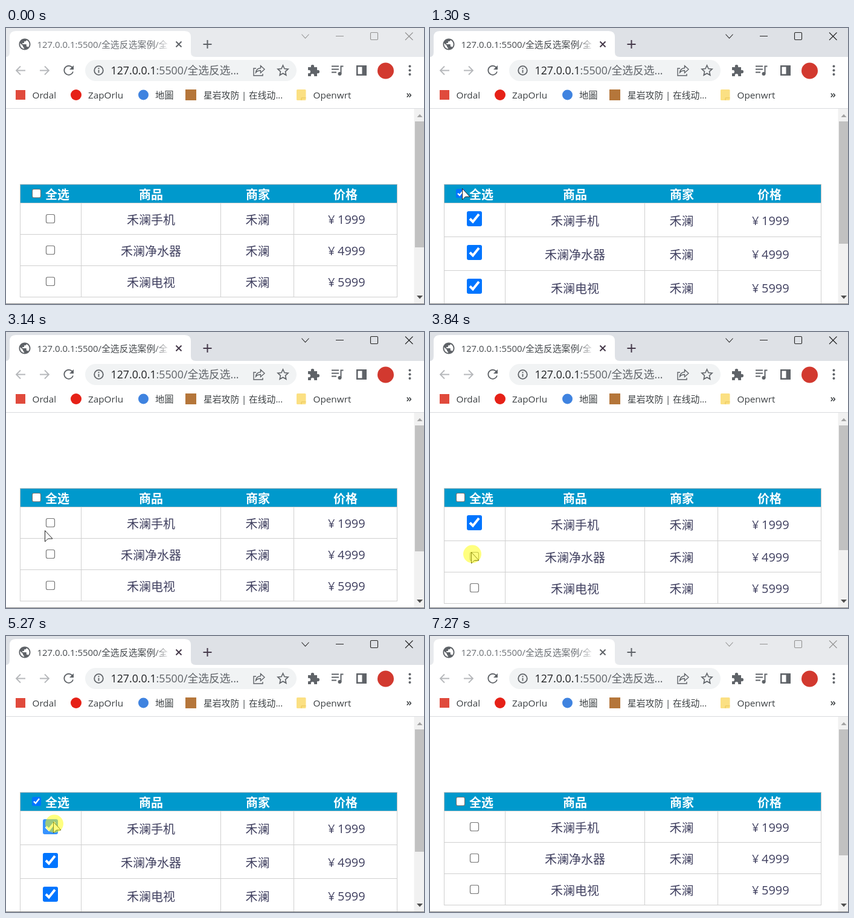
These frames come from a looping animation (692 px wide and 458 px high, 7.34 s). An HTML page:

```html
<!DOCTYPE html>
<html lang="zh-CN">
<head>
<meta charset="utf-8">
<style>
html, body { margin: 0; width: 100%; height: 100%; overflow: hidden; background: #fff; }
svg { display: block; width: 692px; height: 458px; font-family: "Open Sans", "Noto Sans CJK SC", "Noto Sans CJK", sans-serif; }
.line { fill: none; stroke: #5f6368; stroke-width: 1.8; }
.mark { font-size: 15.3px; fill: #3c4043; }
.head { font-size: 20px; font-weight: 700; fill: #fff; text-anchor: middle; }
.cell { font-size: 20px; fill: #404060; }
.mid { text-anchor: middle; }
</style>
</head>
<body>
<svg viewBox="0 0 692 458">
  <defs>
    <linearGradient id="fade"><stop stop-color="#fff" stop-opacity="0"/><stop offset="1" stop-color="#fff"/></linearGradient>
    <clipPath id="page"><rect y="134" width="676" height="323"/></clipPath>
  </defs>
  <rect width="692" height="458" fill="#fff"/>

  <!-- title bar -->
  <rect id="bar" width="692" height="48"/>
  <path d="M0 48Q6 48 6 40V15Q6 5 16 5H296Q306 5 306 15V40Q306 48 314 48Z" fill="#fff"/>
  <path transform="translate(19.600 15.600) scale(.95)" fill="#5f6368" d="M12 2C6.480 2 2 6.480 2 12s4.480 10 10 10 10-4.480 10-10S17.520 2 12 2zm-1 17.930c-3.950-.49-7-3.850-7-7.930 0-.62.080-1.210.21-1.790L9 15v1c0 1.100.9 2 2 2v1.930zm6.900-2.540c-.26-.81-1-1.390-1.900-1.390h-1v-3c0-.55-.45-1-1-1H8v-2h2c.55 0 1-.45 1-1V7h2c1.100 0 2-.9 2-2v-.41c2.930 1.190 5 4.060 5 7.410 0 2.080-.8 3.970-2.100 5.390z"/>
  <text id="tab" x="51.500" y="33" font-size="14.900">127.0.0.1:5500/全选反选案例/全</text>
  <rect x="246" y="14" width="26" height="26" fill="url(#fade)"/>
  <rect x="271" y="14" width="9" height="26" fill="#fff"/>
  <path id="tabTools" d="M281.500 22.500l9 9m0-9l-9 9M326.500 27h14M333.500 20v14" fill="none" stroke-width="2"/>
  <path id="winTools" d="M489.500 10.500l6 6.500 6-6.500M546 13.500h13M605 7.500h9q1.500 0 1.500 1.500v9q0 1.500-1.500 1.500h-9q-1.500 0-1.500-1.500v-9q0-1.500 1.500-1.500zM661 7.500l12.500 12.500m0-12.500l-12.500 12.500" fill="none" stroke-width="1.100"/>

  <!-- toolbar -->
  <path class="line" style="stroke:#b6b8bb" d="M32 70.500H17m7-7l-7 7 7 7M56 70.500h15m-7-7l7 7-7 7"/>
  <path class="line" d="M110 66a7.500 7.500 0 1 0 1 6.500"/>
  <path d="M112 62v7h-7z" fill="#5f6368"/>
  <rect x="131" y="53" width="350" height="35" rx="17.500" fill="#f1f3f4"/>
  <circle class="line" cx="153.500" cy="70.500" r="7.300"/>
  <path class="line" d="M153.500 69.500v5M153.500 66v2"/>
  <text x="173.500" y="77" font-size="17.750" fill="#5f6368"><tspan fill="#202124">127.0.0.1</tspan>:5500/全选反选...</text>
  <path class="line" style="stroke-width:1.400" d="M414 67h-4v12h15v-3M413.500 74q1-7 8-7.500v-4l6.500 6-6.500 6v-4q-5 0-8 3.500z"/>
  <path class="line" style="stroke-width:1.600" d="M458.500 62l2.500 5.600 6.100.6-4.600 4.100 1.300 6-5.300-3.100-5.300 3.100 1.300-6-4.600-4.100 6.100-.6z"/>
  <path d="M500 65h5q-1-4 2.500-4t2.500 4h5v5q4-1 4 2.500t-4 2.500v5h-5q1-4-2.500-4t-2.500 4h-5v-5q4 1 4-2.500t-4-2.500z" fill="#5f6368"/>
  <path class="line" style="stroke-width:2" d="M539 63.500h12M539 68.500h12M539 73.500h8M554.500 76V63.500h4"/>
  <circle cx="552.500" cy="76" r="3" fill="#5f6368"/>
  <path d="M580 62h17v17h-17zM582.500 64.500v12h7v-12z" fill="#5f6368" fill-rule="evenodd"/>
  <circle cx="628.500" cy="71" r="13.500" fill="#d2392f"/>
  <g fill="#5f6368"><circle cx="668.500" cy="63.500" r="2"/><circle cx="668.500" cy="70.300" r="2"/><circle cx="668.500" cy="77" r="2"/></g>

  <!-- bookmarks -->
  <rect x="16" y="103" width="16" height="16" fill="#e04a3c"/>
  <circle cx="116" cy="111" r="9" fill="#e62117"/>
  <circle cx="227.500" cy="111" r="8.500" fill="#3f83e0"/>
  <rect x="297" y="102" width="18" height="18" fill="#b5763a"/>
  <path d="M481 103.500q0-1.500 1.500-1.500h12.500q1.500 0 1.500 1.500v15q0 1.500-1.500 1.500h-12.500q-1.500 0-1.500-1.500z" fill="#fbe083"/>
  <path d="M489 120v-4h7.500" fill="none" stroke="#e9c457"/>
  <g class="mark">
    <text x="43.500" y="117">Ordal</text>
    <text x="136" y="117">ZapOrlu</text>
    <text x="247" y="117">地圖</text>
    <text x="327" y="117" font-size="14.800">星岩攻防 | 在线动...</text>
    <text x="508.500" y="117">Openwrt</text>
    <text x="662.500" y="116" font-size="17" font-weight="600">»</text>
  </g>
  <path d="M0 133.500h692" stroke="#d9dbde"/>

  <g id="table" clip-path="url(#page)"></g>

  <!-- scrollbar -->
  <rect x="675.500" y="134" width="16.500" height="323" fill="#f1f1f1"/>
  <path d="M680.500 148l4.500-5 4.500 5z" fill="#a3a3a3"/>
  <path d="M680 444l5 5.500 5-5.500z" fill="#505050"/>
  <rect id="thumb" x="677" y="155" width="15" fill="#c1c1c1"/>
  <g id="pointer">
    <path d="M.5.5V19L5.500 14H13Z" fill="#fff" stroke="#222" stroke-linejoin="round"/>
    <circle id="press" cx="2" cy="3.500" r="15" fill="#ff0" fill-opacity=".5"/>
  </g>
  <path d="M0 457.500h692" stroke="#8b8b8b"/>
</svg>
<script>
const LOOP = 7340, HOLD = 100, ALL = -1;
const PRODUCTS = [["手机", 1999], ["净水器", 4999], ["电视", 5999]];
const BRAND = "禾澜";
const CLICKS = [[1200, ALL], [1770, ALL], [3300, 0], [3840, 1], [4550, 2], [5270, 0], [5930, 1], [6340, 2]];
// time, x, y of the pointer tip
const PATH = [
  [330, 595, 445], [560, 386, 394], [650, 296, 370], [760, 131, 308], [840, 41, 268],
  [1010, 41, 268], [1130, 53, 266], [1520, 53, 266], [1550, 50, 268], [1710, 50, 268],
  [1770, 51, 267], [2280, 51, 267], [2500, 70, 300], [2750, 88, 344], [3050, 80, 344],
  [3140, 64, 329], [3300, 70, 317], [3400, 70, 317], [3710, 68, 365], [3940, 68, 365],
  [4180, 72, 418], [4380, 72, 418], [4550, 73, 431], [4860, 73, 431], [5100, 78, 308],
  [5600, 78, 308], [5900, 75, 362], [6030, 75, 362], [6310, 72, 418], [6440, 72, 418], [6830, 75, 462]
];
const $ = id => document.getElementById(id);
const set = (id, attrs) => { for (const k in attrs) $(id).setAttribute(k, attrs[k]); };

function pointerAt(t) {
  const i = PATH.findIndex(p => p[0] > t);
  if (i < 1) return null;
  const [a, b] = [PATH[i - 1], PATH[i]], k = (t - a[0]) / (b[0] - a[0]);
  return { x: a[1] + (b[1] - a[1]) * k, y: a[2] + (b[2] - a[2]) * k };
}

function checkedAt(t) {
  let rows = [false, false, false];
  for (const [start, target] of CLICKS) {
    if (t < start + HOLD) break;
    if (target === ALL) rows = rows.fill(!rows.every(Boolean));
    else rows[target] = !rows[target];
  }
  return rows;
}

function checkbox(cx, cy, size, on, tip, pressed) {
  const r = size / 2;
  const hover = tip && Math.abs(tip.x - cx) <= r && Math.abs(tip.y - cy) <= r;
  const box = (inset, style) => `<rect x="${cx - r + inset}" y="${cy - r + inset}" width="${size - 2 * inset}" height="${size - 2 * inset}" rx="${size > 20 ? 3 : 2.5}" ${style}/>`;
  if (!on) {
    const edge = hover ? (pressed ? "#8d8d8d" : "#4f4f4f") : "#767676";
    return box(.5, `fill="#fff" stroke="${edge}" stroke-width="1.2"`);
  }
  const fill = hover ? (pressed ? "#3793ff" : "#005cc8") : "#0075ff";
  const p = (x, y) => `${cx + x * size} ${cy + y * size}`;
  return box(0, `fill="${fill}"`) +
    `<path d="M${p(-.3, 0)}L${p(-.1, .2)}L${p(.3, -.3)}" fill="none" stroke="#fff" stroke-width="${size * .16}"/>`;
}

const text = (x, y, cls, s) => `<text x="${x}" y="${y}" class="${cls}">${s}</text>`;

function tableMarkup(rows, tip, pressed) {
  let out = `<rect x="23.5" y="259.5" width="624" height="31" fill="#0099cc" stroke="#c0c0c0"/>`;
  out += checkbox(50.5, 274.5, 15, rows.every(Boolean), tip, pressed);
  [["全选", 85], ["商品", 240], ["商家", 417], ["价格", 562]].forEach(([s, x]) => out += text(x, 284, "head", s));
  let top = 290.5, lines = `M23 ${top}H648`;
  PRODUCTS.forEach(([name, price], i) => {
    const on = rows[i], base = top + (on ? 37 : 35);
    out += checkbox(73.5, top + 26, on ? 25 : 15, on, tip, pressed);
    out += text(240, base, "cell mid", BRAND + name) + text(416.5, base, "cell mid", BRAND);
    out += text(533, base - .5, "cell", "¥") + text(549, base - .5, "cell", price);
    top += on ? 56 : 52;
    lines += `M23 ${top}H648`;
  });
  for (const x of [23.5, 124.5, 355.5, 476.5, 647.5]) lines += `M${x} 290V${top}`;
  return out + `<path d="${lines}" fill="none" stroke="#d0d0d0"/>`;
}

function draw(t) {
  const tip = pointerAt(t), rows = checkedAt(t);
  const pressed = CLICKS.some(([s]) => t >= s && t < s + HOLD);
  const active = t >= 1200 && t < 7270;
  set("bar", { fill: active ? "#dee1e6" : "#e8eaed" });
  set("tab", { fill: active ? "#45494d" : "#6b6f74" });
  set("tabTools", { stroke: active ? "#45394a" : "#5f6368" });
  set("winTools", { stroke: active ? "#222" : "#929292" });
  set("thumb", { height: 209 - 2 * rows.filter(Boolean).length });
  $("table").innerHTML = tableMarkup(rows, tip, pressed);
  set("pointer", { visibility: tip ? "visible" : "hidden" });
  if (tip) set("pointer", { transform: `translate(${Math.round(tip.x)} ${Math.round(tip.y)})` });
  set("press", { display: pressed ? "inline" : "none" });
}

const began = performance.now();
function tick() {
  draw((performance.now() - began) % LOOP);
  requestAnimationFrame(tick);
}
tick();
</script>
</body>
</html>
```
